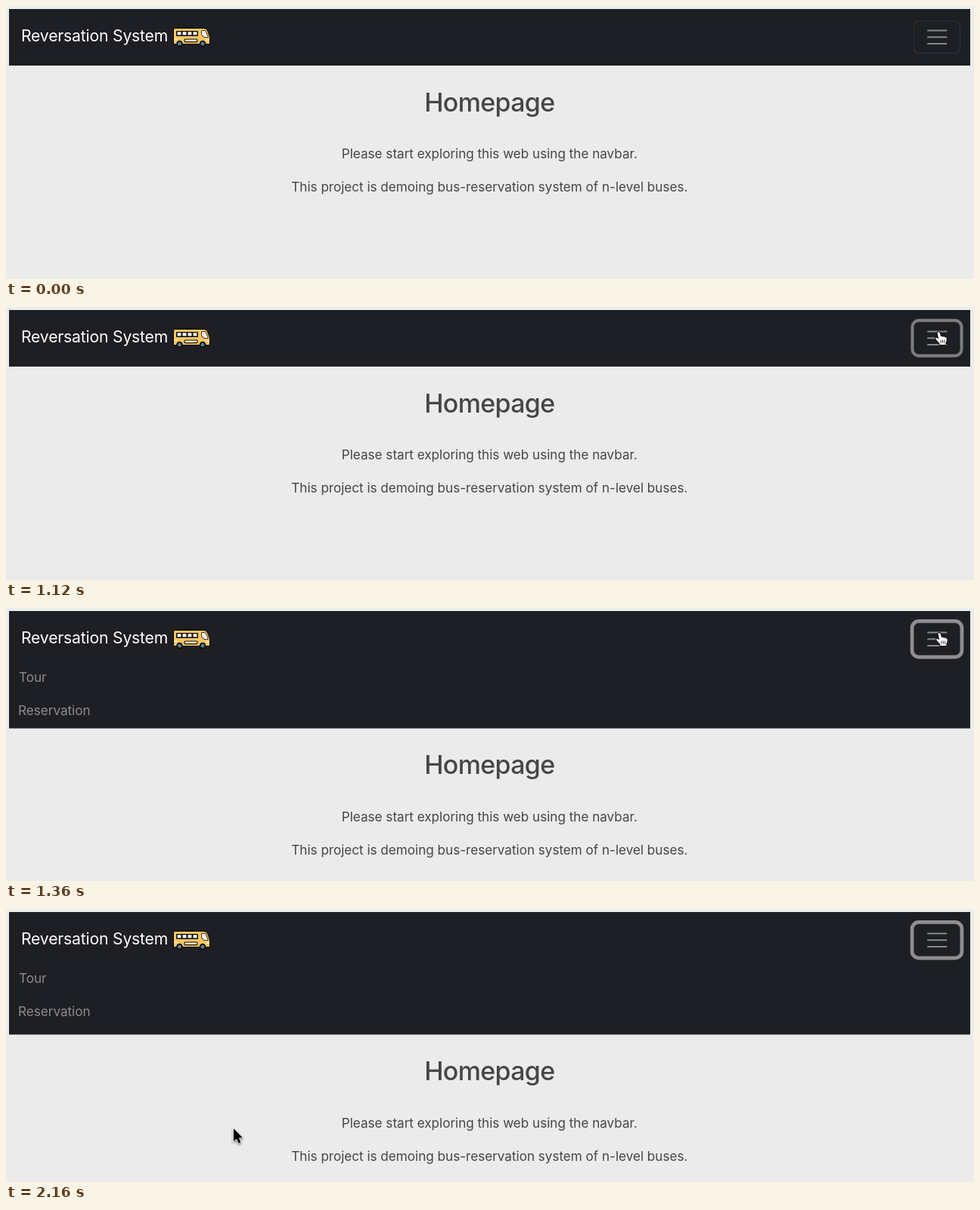
Write an HTML page with a canvas that moves like this. It is 1280 by 362 pixels and loops after 2.4 s.

```html
<!DOCTYPE html>
<html lang="en">
<head>
<meta charset="utf-8">
<title>Reversation System</title>
<style>
  html, body { margin: 0; width: 100%; height: 100%; overflow: hidden; background: #ebebeb; }
  canvas { display: block; width: 100vw; height: 100vh; }
</style>
</head>
<body>
<canvas id="stage" width="1280" height="362"></canvas>
<script>
const ctx = document.getElementById('stage').getContext('2d');
const LOOP = 2400, STEP = 80;
const NAV = { x: 4, y: 4, width: 1271, closed: 79, menu: 87.5, pad: 8.8 };
const DARK = '#1e1f24';
const GRAY = '#464646';

// Pointer path: time, x, y of the tip
const POINTER = [
  [240, 1252, 350], [320, 1200, 280], [400, 1149, 190], [480, 1240, 110],
  [560, 1292, 60], [640, 1262, 25], [720, 1242, 31], [880, 1234, 33],
  [1120, 1233, 33], [1200, 1234, 33], [1840, 1234, 33],
  [1920, 950, 110], [2000, 450, 230], [2080, 241, 282], [2160, 301, 291], [LOOP, 301, 291]
];

const clamp = v => Math.min(1, Math.max(0, v));

function bezierEase(x1, y1, x2, y2) {
  const at = (a, b, u) => 3 * a * u * (1 - u) ** 2 + 3 * b * u * u * (1 - u) + u ** 3;
  return x => {
    let low = 0, high = 1;
    for (let i = 0; i < 24; i++) {
      const mid = (low + high) / 2;
      if (at(x1, x2, mid) < x) low = mid; else high = mid;
    }
    return at(y1, y2, high);
  };
}
const ease = bezierEase(0.25, 0.1, 0.25, 1);
const easeInOut = bezierEase(0.42, 0, 0.58, 1);

function text(str, x, y, { size = 17.2, weight = 400, color = GRAY, align = 'left', spacing = -0.05 } = {}) {
  ctx.font = `${weight} ${size}px Inter, sans-serif`;
  ctx.letterSpacing = spacing + 'px';
  ctx.textAlign = align;
  ctx.fillStyle = color;
  ctx.fillText(str, x, y);
}

function roundBox(x, y, w, h, r, fill, stroke, lineWidth = 1) {
  ctx.beginPath();
  ctx.roundRect(x, y, w, h, r);
  if (fill) { ctx.fillStyle = fill; ctx.fill(); }
  if (stroke) { ctx.strokeStyle = stroke; ctx.lineWidth = lineWidth; ctx.stroke(); }
}

function shape(path, fill, stroke, lineWidth) {
  const p = new Path2D(path);
  ctx.lineJoin = ctx.lineCap = 'round';
  if (stroke) { ctx.strokeStyle = stroke; ctx.lineWidth = lineWidth; ctx.stroke(p); }
  if (fill) { ctx.fillStyle = fill; ctx.fill(p); }
}

function drawBus() {
  const ink = '#090a0c';
  ctx.save();
  ctx.translate(221, 28);
  shape('M17 2V.8H20V2M22 2V.8H25V2', null, ink, 1.5);
  shape('M2 2H40Q44 2 45 5L48 13V22H1V4Q1 2 2 2Z', '#fbc661', ink, 2);
  roundBox(4, 5, 29, 7, 1, ink);
  for (let i = 0; i < 4; i++) roundBox(5.5 + i * 7, 6.3, 5, 4.3, 0.5, '#f7f3f1');
  shape('M38 5H42.5L46 13H41L38 10Z', '#f7edeb', ink, 1.5);
  roundBox(15, 16, 17, 3.6, 1, '#fff0cb', ink, 1.2);
  shape('M2 16H5M44 17H47', null, '#f7edeb', 1.6);
  for (const x of [8.5, 39]) {
    ctx.beginPath();
    ctx.arc(x, 22, 3.4, 0, Math.PI * 2);
    ctx.fillStyle = '#557c89';
    ctx.fill();
    ctx.strokeStyle = ink;
    ctx.lineWidth = 1.8;
    ctx.stroke();
  }
  ctx.restore();
}

function drawToggler(t) {
  roundBox(1200.5, 20, 61, 42.5, 6.6, null, '#33343a', 1.1);
  const focus = easeInOut(clamp((t - 1012) / 150));
  if (focus > 0) {
    const spread = 4.6 * focus;
    const half = spread / 2;
    roundBox(1200.3 - half, 19.7 - half, 61.4 + spread, 43.1 + spread, 6.6 + half,
      null, `rgba(255,255,255,${0.5 * focus})`, spread);
  }
  shape('M1219 32.6H1243.5M1219 41.3H1243.5M1219 50H1243.5', null, '#88898c', 2);
}

function drawArrow() {
  ctx.save();
  ctx.shadowColor = 'rgba(0,0,0,.35)';
  ctx.shadowBlur = 3;
  ctx.shadowOffsetY = 1.5;
  const path = 'M0 0V17L3.9 13.4L6.6 19.6L9.4 18.4L6.8 12.3H12Z';
  shape(path, '#fff', '#fff', 2);
  ctx.restore();
  shape(path, '#000');
}

function drawHand() {
  shape('M-1.4 1Q0-.8 1.5 1L3.3 6.3Q4.8 5 6 6.7Q7.6 5.6 8.6 7.3Q10.7 6.8 10.8 9'
    + 'Q11.2 12.5 9.4 14.5V17H1.4V15Q-1.2 12.8-3.7 9.6Q-4.2 7.4-2 8L.2 9.2Z', '#fff', '#0b0b0d', 2);
  shape('M3.1 11V14.3M5.4 11V14.3M7.7 11V14.3', null, '#222327', 0.9);
}

function drawPointer(t) {
  const next = POINTER.findIndex(p => p[0] > t);
  if (next < 1) return;
  const [t0, x0, y0] = POINTER[next - 1];
  const [t1, x1, y1] = POINTER[next];
  const k = (t - t0) / (t1 - t0);
  const x = x0 + (x1 - x0) * k, y = y0 + (y1 - y0) * k;
  const overButton = x > 1200 && x < 1262 && y > 20 && y < 63;
  ctx.save();
  ctx.translate(x, y);
  overButton ? drawHand() : drawArrow();
  ctx.restore();
}

function drawMenu(bottom) {
  ctx.save();
  ctx.beginPath();
  ctx.rect(NAV.x, 70, NAV.width, bottom - NAV.pad - 70);
  ctx.clip();
  text('Tour', 17, 98.3, { color: '#8b8c8e' });
  text('Reservation', 16, 142.3, { color: '#8b8c8e' });
  ctx.restore();
}

function draw(t) {
  const shift = NAV.menu * ease(clamp((t - 1129) / 350));
  const bottom = NAV.closed + shift;
  ctx.fillStyle = '#ebebeb';
  ctx.fillRect(0, 0, 1280, 362);
  ctx.fillStyle = '#ebefec';
  ctx.fillRect(0, 0, 1280, 4);
  ctx.fillStyle = DARK;
  ctx.fillRect(NAV.x, NAV.y, NAV.width, bottom - NAV.y);

  text('Reversation System', 20, 47, { size: 21.2, color: '#fff', spacing: -0.2 });
  drawBus();
  drawToggler(t);
  if (shift > 0) drawMenu(bottom);

  const center = { align: 'center' };
  text('Homepage', 639.3, 139.5 + shift, { ...center, size: 34, weight: 500, spacing: -0.68 });
  text('Please start exploring this web using the navbar.', 639.3, 202 + shift, center);
  text('This project is demoing bus-reservation system of n-level buses.', 639.3, 246 + shift, center);
  drawPointer(t);
}

const start = performance.now();
function tick() {
  const t = (performance.now() - start) % LOOP;
  draw(Math.floor(t / STEP) * STEP);
  requestAnimationFrame(tick);
}
tick();
</script>
</body>
</html>
```
